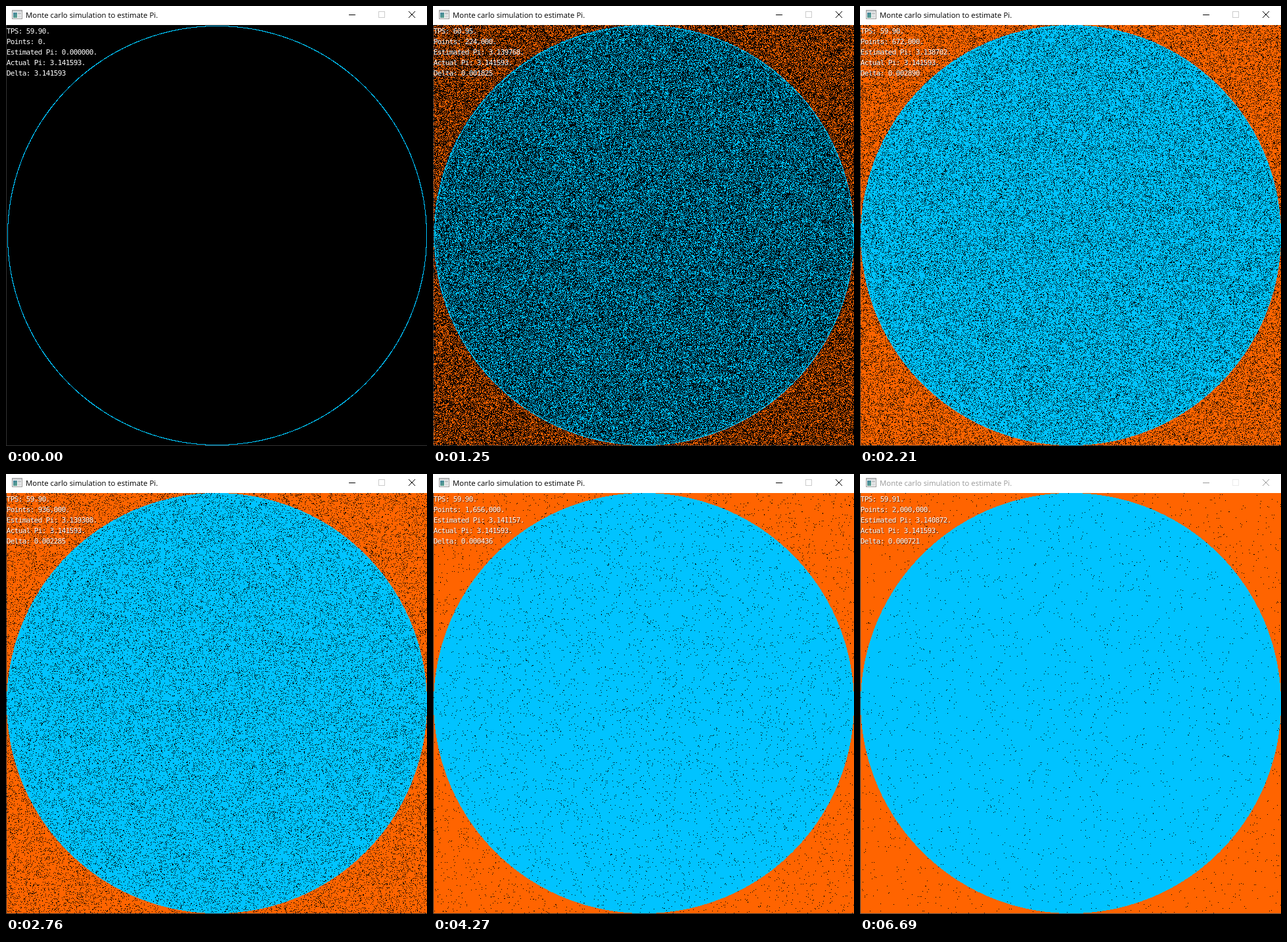
An HTML page with a canvas that plays this animation: 641x670 px, repeating every 6.77 s.

```html
<!DOCTYPE html>
<html lang="en">
<head>
<meta charset="utf-8">
<title>Monte carlo simulation to estimate Pi.</title>
<style>
  html, body { margin: 0; width: 100%; height: 100%; overflow: hidden; background: #fff; }
  canvas { display: block; }
</style>
</head>
<body>
<canvas id="stage" width="641" height="670"></canvas>
<script>
const ctx = document.getElementById('stage').getContext('2d');
const LOOP = 6770, START = 850, LAST_STEP = 53, INACTIVE_AT = 6690;
const SIZE = 640, LEFT = 1, TOP = 29, RADIUS = SIZE / 2;
const PER_TICK = 8000, MAX_TICKS = 250;
const SHORT_STEPS = [20, 27, 40, 50];
const TITLE = 'Monte carlo simulation to estimate Pi.';

// [tick, estimate], linear in between
const ESTIMATES = [[0, 3.1425], [28, 3.139768], [61, 3.138279],
  [117, 3.139308], [164, 3.141442], [250, 3.140872]];
// [time, ticks per second]
const RATES = [[0, '59.90'], [1010, '60.95'], [2030, '59.90'], [3030, '59.92'],
  [4040, '59.90'], [5050, '59.87'], [6070, '59.91']];

function seeded(seed) {
  return () => {
    seed = (seed + 0x6D2B79F5) | 0;
    let r = Math.imul(seed ^ (seed >>> 15), 1 | seed);
    r = (r + Math.imul(r ^ (r >>> 7), 61 | r)) ^ r;
    return ((r ^ (r >>> 14)) >>> 0) / 4294967296;
  };
}

// The tick at which each pixel receives its first point; 255 means never.
const firstHit = new Uint8Array(SIZE * SIZE).fill(255);
const random = seeded(314159);
for (let tick = 1; tick <= MAX_TICKS; tick++) {
  for (let i = 0; i < PER_TICK; i++) {
    const p = Math.floor(random() * SIZE) + SIZE * Math.floor(random() * SIZE);
    if (firstHit[p] === 255) firstHit[p] = tick;
  }
}

const rgb = (r, g, b) => (255 << 24 | b << 16 | g << 8 | r) >>> 0;
const BLACK = rgb(0, 0, 0), BLUE = rgb(0, 195, 255), ORANGE = rgb(255, 100, 0);
const field = ctx.createImageData(SIZE, SIZE);
const pixels = new Uint32Array(field.data.buffer);

const colours = new Uint32Array(SIZE * SIZE);
for (let p = 0; p < colours.length; p++) {
  const x = p % SIZE + 0.5 - RADIUS, y = Math.floor(p / SIZE) + 0.5 - RADIUS;
  colours[p] = x * x + y * y < RADIUS * RADIUS ? BLUE : ORANGE;
}

// Outline pixels show from the beginning.
for (let i = 0; i < 4000; i++) {
  const a = i / 4000 * 2 * Math.PI, r = RADIUS - 1;
  const x = Math.round(RADIUS + r * Math.cos(a));
  const y = Math.round(RADIUS + r * Math.sin(a));
  colours[y * SIZE + x] = BLUE;
  firstHit[y * SIZE + x] = 0;
}

let shownTicks = -1;
function drawField(ticks) {
  if (ticks !== shownTicks) {
    for (let p = 0; p < pixels.length; p++) {
      pixels[p] = firstHit[p] <= ticks ? colours[p] : BLACK;
    }
    shownTicks = ticks;
  }
  ctx.putImageData(field, LEFT, TOP);
}

function ticksAt(t) {
  if (t < START) return 0;
  let step = 0, at = START;
  while (step < LAST_STEP) {
    at += SHORT_STEPS.includes(step + 1) ? 70 : 80;
    if (at > t) break;
    step++;
  }
  return Math.min(MAX_TICKS, 28 + Math.round((step - 5) * 4.7));
}

function estimate(ticks) {
  if (!ticks) return 0;
  const k = ESTIMATES.findIndex(e => e[0] >= ticks);
  const [t0, v0] = ESTIMATES[k - 1], [t1, v1] = ESTIMATES[k];
  const value = v0 + (v1 - v0) * (ticks - t0) / (t1 - t0);
  const points = ticks * PER_TICK;
  return 4 * Math.round(value * points / 4) / points;
}

function rect(colour, x, y, w, h) {
  ctx.fillStyle = colour;
  ctx.fillRect(x, y, w, h);
}

// Fixed cells, 6 px wide and 16 px high
function cellText(lines, dx, dy, colour) {
  ctx.fillStyle = colour;
  lines.forEach((line, row) => {
    [...line].forEach((c, col) => ctx.fillText(c, 0.7 + col * 6 + dx, 42 + row * 16 + dy));
  });
}

function drawStats(t, ticks) {
  const pi = estimate(ticks);
  const lines = [
    `TPS: ${RATES.filter(r => r[0] <= t).pop()[1]}.`,
    `Points: ${(ticks * PER_TICK).toLocaleString('en-US')}.`,
    `Estimated Pi: ${pi.toFixed(6)}.`,
    `Actual Pi: ${Math.PI.toFixed(6)}.`,
    `Delta: ${Math.abs(Math.PI - pi).toFixed(6)}`
  ];
  ctx.font = '11px "DejaVu Sans Mono", monospace';
  cellText(lines, 1, 1, 'rgba(0,0,0,0.5)');
  cellText(lines, 0, 0, '#fff');
}

function drawIcon() {
  rect('#9c9c9c', 9, 6, 16, 14);
  rect('#f4f4f4', 10, 7, 14, 12);
  rect('#c9cdd0', 10, 7, 14, 2);
  const shade = ctx.createLinearGradient(11, 9, 17, 18);
  shade.addColorStop(0, '#3f7fa0');
  shade.addColorStop(1, '#5fa58c');
  rect(shade, 11, 10, 6, 8);
  rect('#c4c8ca', 18, 10, 5, 3);
  rect('#dadcde', 18, 14, 5, 4);
}

function drawWindow(active) {
  const ink = active ? '#000' : '#999';
  rect('#fff', 0, 0, 641, TOP);
  drawIcon();
  ctx.fillStyle = ink;
  ctx.font = '11.4px "Open Sans", "Noto Sans", sans-serif';
  ctx.textRendering = 'geometricPrecision';
  ctx.fillText(TITLE, 30, 18);
  ctx.textRendering = 'auto';

  rect(ink, 522, 13, 10, 1);
  ctx.lineWidth = 1;
  ctx.strokeStyle = active ? '#ccc' : '#ebebeb';
  ctx.strokeRect(567.5, 8.5, 9, 9);
  ctx.strokeStyle = ink;
  ctx.beginPath();
  ctx.moveTo(613, 8);
  ctx.lineTo(623, 18);
  ctx.moveTo(623, 8);
  ctx.lineTo(613, 18);
  ctx.stroke();

  const border = active ? '#333' : '#4a4a4a';
  rect(border, 0, TOP, 1, 641);
  rect(border, 0, 669, 641, 1);
}

const begin = performance.now();
function draw(now) {
  const t = Math.max(0, now - begin) % LOOP;
  const ticks = ticksAt(t);
  drawField(ticks);
  drawStats(t, ticks);
  drawWindow(t < INACTIVE_AT);
  requestAnimationFrame(draw);
}
draw(begin);
</script>
</body>
</html>
```
